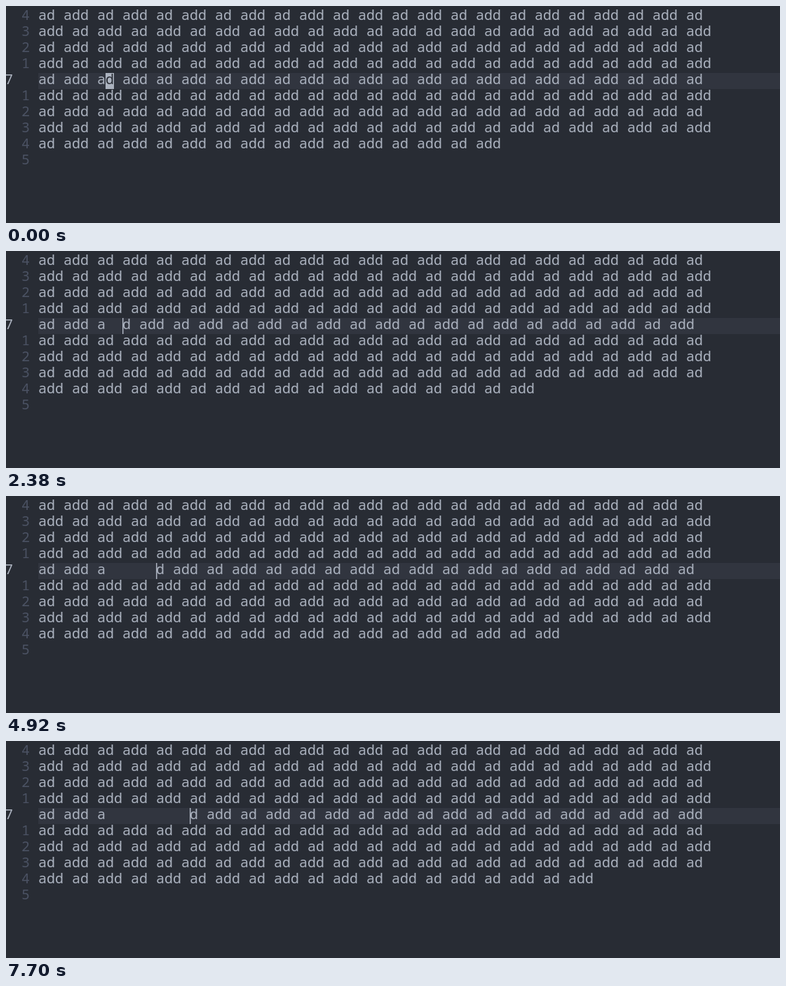
These frames come from a looping animation (1104x311 px, 8000 ms). An HTML page:

```html
<!DOCTYPE html>
<html lang="en">
<head>
<meta charset="utf-8">
<title>Typing spaces with automatic wrapping</title>
<style>
  html, body { margin: 0; width: 1104px; height: 311px; overflow: hidden; background: #282c34; }
  svg { display: block; }
  text { font: 500 20px "Noto Sans Mono", "Liberation Mono", monospace; white-space: pre; fill: #abb2bf; }
  .gutter { fill: #4b5263; }
  .inverse { fill: #282c34; }
</style>
</head>
<body>
<svg id="stage" width="1104" height="311"></svg>
<script>
const LEFT = 46, CELL = 12, ROW = 23, BASE = 20, LIMIT = 80;
const CURSOR_ROW = 4, CURSOR_COL = 8, LOOP = 8000;
const INSERT_AT = 560;
// The last two spaces arrive together.
const SPACES_AT = [1840, 2380, 2920, 3520, 4340, 4920, 5740, 6420, 7700, 7700];

const stage = document.getElementById('stage');
const words = Array.from({ length: 200 }, (_, i) => i % 2 ? 'add' : 'ad');

function wrap(list) {
  const lines = [];
  let line = list[0];
  for (const word of list.slice(1)) {
    if (line.length + 1 + word.length > LIMIT) {
      lines.push(line);
      line = word;
    } else line += ' ' + word;
  }
  return [...lines, line];
}

const text = (col, row, body, cls = '') =>
  `<text x="${LEFT + col * CELL}" y="${BASE + row * ROW}" class="${cls}">${body}</text>`;
const rect = (x, width, fill) =>
  `<rect x="${x}" y="96" width="${width}" height="${ROW}" fill="${fill}"/>`;

function draw(inserting, spaces) {
  const above = wrap(words.slice(0, 92));
  const below = ['ad', 'add', 'a' + ' '.repeat(spaces) + 'd', ...words.slice(95)];
  const cursorX = LEFT + (CURSOR_COL + spaces) * CELL;
  const cursor = rect(cursorX, inserting ? 1.5 : CELL, '#abb2bf');

  let out = rect(LEFT, 1104 - LEFT, '#31353f');
  if (!inserting) out += cursor;
  [...above, ...wrap(below)].forEach((line, row) => {
    if (row === CURSOR_ROW && !inserting)
      line = line.slice(0, CURSOR_COL) + '<tspan class="inverse">d</tspan>' + line.slice(CURSOR_COL + 1);
    out += text(0, row, line);
  });
  for (let row = 0; row < 10; row++) {
    out += row === CURSOR_ROW
      ? text(-4, row, '7')
      : text(-2, row, Math.abs(row - CURSOR_ROW), 'gutter');
  }
  stage.innerHTML = out + (inserting ? cursor : '');
}

let shown;
function tick() {
  const t = performance.now() % LOOP;
  const inserting = t >= INSERT_AT;
  const spaces = SPACES_AT.filter(at => t >= at).length;
  const state = inserting + ' ' + spaces;
  if (state !== shown) draw(inserting, spaces);
  shown = state;
  requestAnimationFrame(tick);
}
tick();
</script>
</body>
</html>
```
